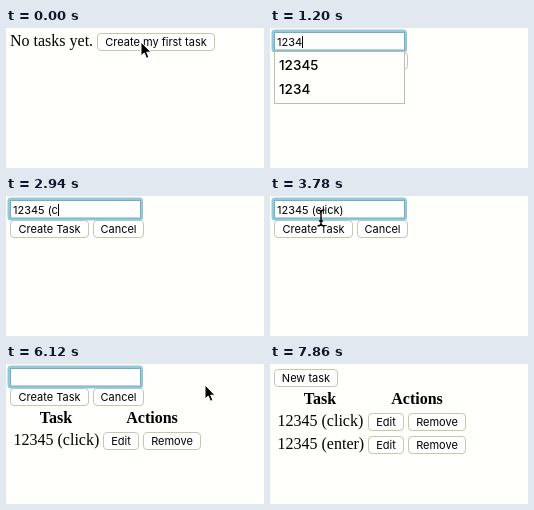
Recreate the animation shown at these times as an HTML page. Size 258 by 140 pixels, loop 8000 ms.

```html
<!DOCTYPE html>
<html lang="en">
<head>
<meta charset="utf-8">
<title>Task list</title>
<style>
html, body { margin: 0; height: 100%; overflow: hidden; background: #fffffb; }
svg { display: block; width: 100vw; height: 100vh; }
text { white-space: pre; fill: #000; }
.page { font: 16px "Liberation Serif", serif; }
.head { font-weight: bold; text-anchor: middle; }
.ui { font: 11px Inter, sans-serif; }
.label { text-anchor: middle; }
.item { font: 500 13.5px Inter, sans-serif; }
</style>
</head>
<body>
<svg id="stage" viewBox="0 0 258 140"></svg>
<script>
const LOOP = 8000;
const FORM_1 = 480, LIST_1 = 4260, FORM_2 = 5460, LIST_2 = 7860;
const history = ["123", "12345", "123\\", "12", "1234"];

// start, delay between keys, text
const typing = [
  [840, 120, "12345"], [2610, 30, " ("], [2910, 70, "click)"],
  [6180, 120, "12345"], [7110, 67, " (ent"], [7560, 1, "e"], [7710, 60, "r)"]
];

// time, x, y, shape from that time on
const pointer = [
  [0, 135, 14, "arrow"], [330, 128, 13, "arrow"], [480, 128, 13, "arrow"],
  [690, 140, 30, "arrow"], [840, 140, 30, ""], [1380, 172, 50, "arrow"],
  [1530, 172, 50, "arrow"], [1710, 130, 31, "arrow"], [1800, 101, 17, "beam"],
  [2310, 101, 17, "beam"], [2400, 126, 25, "beam"], [2640, 126, 25, ""],
  [3480, 132, 70, "arrow"], [3720, 57, 30, "arrow"], [3780, 51, 22, "beam"],
  [3930, 46, 33, "arrow"], [4680, 46, 33, "arrow"], [4830, 57, 21, "arrow"],
  [5190, 57, 21, "arrow"], [5310, 50, 15, "arrow"], [5460, 50, 15, "arrow"],
  [5670, 182, 30, "arrow"], [5820, 182, 30, "arrow"], [5970, 199, 21, "arrow"],
  [6150, 199, 21, ""], [LOOP, 199, 21, ""]
];

const shapes = {
  arrow: '<path d="M0 0V14L3.2 11 5.5 16.3 7.9 15.2 5.7 10.2H10Z" stroke="#fff"/>',
  beam: '<path d="M-3.5-8Q0-8 0-5.5V5.5Q0 8-3.5 8M3.5-8Q0-8 0-5.5M0 5.5Q0 8 3.5 8M-2 3H2" fill="none" stroke="#000" stroke-width="1.4"/>'
};

const between = (t, a, b) => t >= a && t < b;
const text = (x, y, cls, str, extra = "") => `<text x="${x}" y="${y}" class="${cls}" ${extra}>${str}</text>`;
const box = (x, y, w, h, r, fill, stroke, line = 1) =>
  `<rect x="${x}" y="${y}" width="${w}" height="${h}" rx="${r}" fill="${fill}" stroke="${stroke}" stroke-width="${line}"/>`;

function button(x, y, w, label, pressed) {
  return box(x + .5, y + .5, w - 1, 17, 3.5, pressed ? "#4a94ee" : "#fff", pressed ? "#3a80d8" : "#c6c6b4") +
    text(x + w / 2, y + 13, "ui label", label, pressed ? 'style="fill:#fff"' : "");
}

function field(t) {
  const start = t < LIST_1 ? FORM_1 : FORM_2;
  let value = "", last = start;
  for (const [from, gap, str] of typing) {
    [...str].forEach((ch, i) => {
      const at = from + i * gap;
      if (between(at, start, t + .5)) { value += ch; last = at; }
    });
  }
  return { value, last };
}

function suggestions(t, value) {
  const open = between(t, 840, 1530) || between(t, 6180, 6810) || between(t, 7110, 7400);
  if (!open || !value) return "";
  const known = t < LIST_1 ? history : [...history, "12345 (click)", "12345 (enter)"];
  const found = known.filter(s => s.startsWith(value));
  if (!found.length) return "";
  return box(4.5, 23.5, 130, 24 * found.length + 4, 0, "#fffffb", "#bdbdb0") +
    found.map((s, i) => text(9, 42 + 24 * i, "item", s)).join("");
}

function form(t) {
  const { value, last } = field(t);
  const focus = !between(t, 1530, 1950);
  let out = button(4, 24, 79, "Create Task", between(t, 4170, LIST_1)) + button(87, 24, 51, "Cancel");
  if (focus) out += box(3, 3, 132.5, 20, 2, "none", "#92c8de", 3);
  out += box(4.5, 4.5, 130, 17.5, 0, "#fff", focus ? "#74aebf" : "#bcbca4");
  out += text(7, 18, "ui", value, 'id="value"');
  if (focus && (t - last) % 800 < 400) out += '<path id="caret" d="M.5 8V20" stroke="#000"/>';
  return out + suggestions(t, value);
}

function list(names, dy) {
  const dx = names.length - 1;
  return text(50, 40 + dy, "page head", "Task") + text(146 + dx, 40 + dy, "page head", "Actions") +
    names.map((name, i) => {
      const y = 49 + dy + 23 * i;
      return text(7.5, y + 13, "page", name) + button(97 + dx, y, 36, "Edit") + button(137 + dx, y, 58, "Remove");
    }).join("");
}

function cursor(t) {
  const i = pointer.findIndex(p => p[0] > t);
  const [t0, x0, y0, shape] = pointer[i - 1], [t1, x1, y1] = pointer[i];
  if (!shape) return "";
  const k = (t - t0) / (t1 - t0), e = k * k * (3 - 2 * k);
  return `<g transform="translate(${x0 + (x1 - x0) * e} ${y0 + (y1 - y0) * e})">${shapes[shape]}</g>`;
}

function scene(t) {
  const click = "12345 (click)";
  if (t < FORM_1) return text(4, 18, "page", "No tasks yet.") + button(91, 5, 118, "Create my first task", t >= 390);
  if (t < LIST_1) return form(t);
  if (t < FORM_2) return button(4, 5, 64, "New task", t >= 5370) + list([click], 0);
  if (t < LIST_2) return list([click], 19) + form(t);
  return button(4, 5, 64, "New task") + list([click, "12345 (enter)"], 0);
}

const stage = document.getElementById("stage");
let shown = "";

function draw() {
  const t = performance.now() % LOOP;
  const next = scene(t) + cursor(t);
  if (next !== shown) {
    stage.innerHTML = shown = next;
    const caret = document.getElementById("caret");
    if (caret) {
      const width = document.getElementById("value").getComputedTextLength();
      caret.setAttribute("transform", `translate(${Math.round(7 + width)} 0)`);
    }
  }
  requestAnimationFrame(draw);
}
draw();
</script>
</body>
</html>
```
